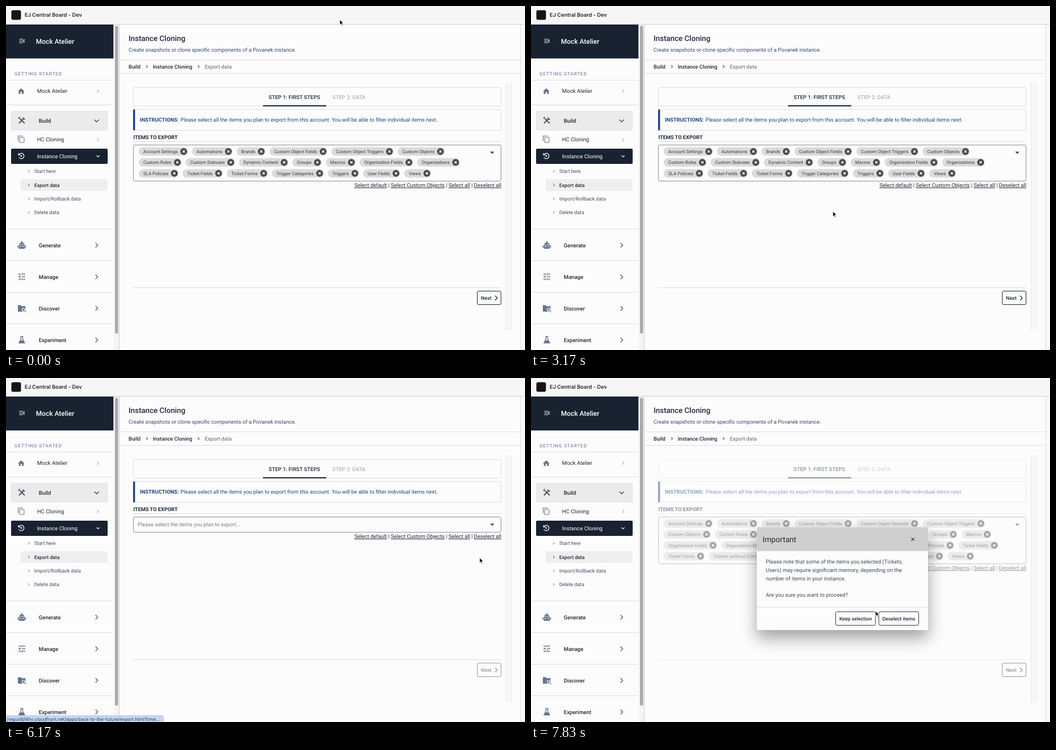
An HTML page for the animation above (8000 ms loop, 919x610 px).

```html
<!DOCTYPE html>
<html lang="en">
<head>
<meta charset="utf-8">
<title>Export data</title>
<style>
  html, body { margin: 0; width: 100%; height: 100%; overflow: hidden; background: #fcfcfd; }
  svg { display: block; font-family: Roboto, sans-serif; text-rendering: geometricPrecision; }
  text { white-space: pre; }
  .link { text-decoration: underline; }
  .dialog { filter: drop-shadow(0 14px 14px rgba(0, 0, 0, .36)); }
</style>
</head>
<body>
<svg id="stage" width="919" height="610" viewBox="0 0 919 610"></svg>
<script>
const NS = 'http://www.w3.org/2000/svg';
const stage = document.getElementById('stage');
const INK = '#1f2937', NAVY = '#182230', SLATE = '#66758c', BLUE = '#1f4585', LINE = '#dcdcde';
const UI = 'Inter, sans-serif';

function add(parent, tag, attrs = {}, content = '') {
  const el = document.createElementNS(NS, tag);
  for (const key in attrs) el.setAttribute(key, attrs[key]);
  el.textContent = content;
  return parent.appendChild(el);
}
const group = (parent, attrs) => add(parent, 'g', attrs);
const rect = (parent, x, y, width, height, fill, attrs) =>
  add(parent, 'rect', { x, y, width, height, fill, ...attrs });
const frame = (parent, x, y, w, h, stroke, attrs) =>
  rect(parent, x, y, w, h, 'none', { stroke, rx: 2.5, ...attrs });
const stroke = (parent, d, color, width = 1, attrs) =>
  add(parent, 'path', { d, fill: 'none', stroke: color, 'stroke-width': width, ...attrs });
const shape = (parent, d, fill, attrs) => add(parent, 'path', { d, fill, ...attrs });
// cy is the middle of the capital letters
const label = (parent, x, cy, content, size, fill = INK, weight = 400, attrs) =>
  add(parent, 'text', { x, y: cy + size * .355, 'font-size': size, fill, 'font-weight': weight, ...attrs }, content);
const chevron = (parent, x, y, r, color, width = 1.2, down) =>
  stroke(parent, `M${-r / 2} ${-r}L${r / 2} 0L${-r / 2} ${r}`, color, width,
    { transform: `translate(${x} ${y}) rotate(${down ? 90 : 0})` });
const icon = (x, y) => group(stage, { transform: `translate(${x} ${y})` });
const cross = (parent, x, y, r, color, width) =>
  stroke(parent, `M${x - r} ${y - r}l${2 * r} ${2 * r}m0 ${-2 * r}l${-2 * r} ${2 * r}`, color, width);

function drawTopBar() {
  rect(stage, 0, 0, 919, 32.5, '#f6f6f7');
  stroke(stage, 'M0 32.5H919', '#cfcfd1');
  rect(stage, 9.5, 7.5, 17, 17, '#151515', { rx: 3 });
  label(stage, 33, 16, 'EJ Central Board - Dev', 9.3, '#252525', 600, { 'font-family': UI });
}

function drawIcons() {
  stroke(icon(28, 62), 'M-4.5 -3H2.5M-4.5 0H1M-4.5 3H2.5M5 -2.5L2.5 0L5 2.5', '#fff', 1.2);
  shape(icon(27, 151), 'M0 -5L6 .5H4.3V5H1.3V1.5H-1.3V5H-4.3V.5H-6Z', SLATE);
  const tools = icon(28, 203);
  stroke(tools, 'M-5 5L3 -3M-3.5 -3.5L5 5', '#465265', 2);
  stroke(tools, 'M-6 -3.5L-3.5 -6M2 -5.5Q2 -2 5.8 -2.3', '#465265', 1.8);
  const copy = icon(27, 236.5);
  frame(copy, -3, -3.5, 8, 9, SLATE, { rx: 1, 'stroke-width': 1.1 });
  stroke(copy, 'M-5.5 3V-6H3', SLATE, 1.1);
  const clock = icon(27, 266);
  stroke(clock, 'M-4 -2.5A4.8 4.8 0 1 1 -4.2 2.2M-4.7 -5V-2H-1.7', '#fff', 1.3);
  add(clock, 'circle', { r: 1.4, fill: '#fff' });
  const robot = icon(28, 424);
  shape(robot, 'M-4.5 -1.5Q-4.5 -4.5 -1 -4.5V-7H1V-4.5Q4.5 -4.5 4.5 -1.5Z', SLATE);
  rect(robot, -5.5, -.8, 11, 7.3, SLATE, { rx: 1.2 });
  stroke(robot, 'M-6.8 1V4.5M6.8 1V4.5', SLATE, 1.4);
  for (const x of [-2.4, 2.4]) add(robot, 'circle', { cx: x, cy: 2.3, r: 1.1, fill: '#fff' });
  stroke(icon(28, 480), 'M-6 -4.5H0M3 -4.5H6M-6 0H-3M0 0H6M-6 4.5H-1M2 4.5H6M1.5 -6.5V-2.5M-3 -2V2M.5 2.5V6.5', SLATE, 1.3);
  const folder = icon(28, 536.5);
  shape(folder, 'M-7 -6H-2L-.5 -4.3H6.5V5.5H-7Z', SLATE);
  add(folder, 'circle', { cx: 3, cy: 2, r: 2.5, fill: SLATE, stroke: '#fff', 'stroke-width': 1.2 });
  stroke(folder, 'M5 4L7.5 6.5', '#fff', 2.6);
  stroke(folder, 'M5 4L7.5 6.5', SLATE, 1.3);
  const flask = icon(28, 592);
  stroke(flask, 'M-2.5 -6H2.5M-1.5 -6V-1.5L-5 5.5H5L1.5 -1.5V-6', SLATE, 1.4);
  shape(flask, 'M-2.7 1H2.7L5 5.5H-5Z', SLATE);
}

function drawSidebar() {
  rect(stage, 0, 33, 190.5, 60, NAVY);
  label(stage, 53, 62.3, 'Mock Atelier', 12, '#fff', 500);
  label(stage, 15, 120.3, 'GETTING STARTED', 8.2, '#5d6f90', 400, { 'letter-spacing': .95 });
  for (const y of [131.5, 175.5, 395.5, 451.5, 507.5, 563.5]) stroke(stage, `M0 ${y}H190`, LINE);
  rect(stage, 9.5, 186.5, 170, 33.5, '#ebebec', { stroke: '#e2e2e3', rx: 2 });
  rect(stage, 9, 253, 171, 27, NAVY, { rx: 2 });
  rect(stage, 26, 307, 153.5, 21, '#eeeeef', { rx: 2 });

  label(stage, 55, 151, 'Mock Atelier', 9.65);
  chevron(stage, 163, 151, 3, '#8a94a3', 1);
  label(stage, 58, 203.5, 'Build', 9.6, INK, 500);
  chevron(stage, 160.5, 203.5, 4, '#3c4858', 1.4, true);
  label(stage, 55, 236.8, 'HC Cloning', 9.65);
  chevron(stage, 163, 236.8, 3, '#8a94a3', 1);
  label(stage, 55, 266.3, 'Instance Cloning', 9.65, '#fff');
  chevron(stage, 163, 266.3, 2.6, '#fff', 1.1, true);
  ['Start here', 'Export data', 'Import/Rollback data', 'Delete data'].forEach((name, i) => {
    const y = 293.2 + i * 24.3, active = i === 1;
    chevron(stage, 40.5, y, 2, active ? INK : '#5b6675', 1);
    label(stage, 50, y, name, 8.75, active ? INK : '#3d4a60', active ? 500 : 400);
  });
  ['Generate', 'Manage', 'Discover', 'Experiment'].forEach((name, i) => {
    const y = 424.2 + i * 56;
    label(stage, 58, y, name, 9.6, INK, 500);
    chevron(stage, 160.5, y, 4, '#53627a', 1.4);
  });
  drawIcons();
  rect(stage, 190.5, 33, 10, 577, '#f4f4f5');
  rect(stage, 193, 35, 5.5, 546, '#a9a9ab', { rx: 2.75 });
  stroke(stage, 'M200.5 33V610', '#cdcdcf');
}

function drawHeader() {
  label(stage, 217, 57.5, 'Instance Cloning', 13.4, INK, 500);
  label(stage, 217, 77.5, 'Create snapshots or clone specific components of a Povanek instance.', 9.43, '#37486b');
  stroke(stage, 'M201 95.5H912M201 119.5H912', LINE);
  label(stage, 217, 107.5, 'Build', 9.35, INK, 500);
  chevron(stage, 249.5, 107.5, 2.5, '#5b6675', 1.1);
  label(stage, 260, 107.5, 'Instance Cloning', 9.3, INK, 500);
  chevron(stage, 341, 107.5, 2.5, '#5b6675', 1.1);
  label(stage, 352, 107.5, 'Export data', 9.3, '#7d8288', 500);
  rect(stage, 912, 33, 7, 577, '#f9f9fa');
  stroke(stage, 'M911.5 33V610', LINE);
  rect(stage, 885.5, 137, 10, 438, '#f6f6f7');
  stroke(stage, 'M885.5 137V575M895.5 137V575', '#e9e9ea');
}

function drawChips(parent, rows) {
  rows.forEach((row, i) => {
    const y = 258 + i * 19.35;
    let x = 235;
    for (const name of row.split('|')) {
      const pill = rect(parent, x, y - 7.5, 0, 15, '#dbdbdc', { rx: 7.5 });
      const width = label(parent, x + 8, y, name, 8.06, '#383838').getComputedTextLength();
      pill.setAttribute('width', width + 25.8);
      add(parent, 'circle', { cx: x + width + 18.5, cy: y, r: 6, fill: '#484848' });
      cross(parent, x + width + 18.5, y, 2, '#fff', 1.4);
      x += width + 33.1;
    }
  });
}

function drawForm(parent) {
  frame(parent, 225.5, 144.5, 651, 33, LINE);
  label(parent, 465, 161.5, 'STEP 1: FIRST STEPS', 9.45, INK, 500);
  label(parent, 578, 161.5, 'STEP 2: DATA', 9.45, '#b0b2b5', 500);
  rect(parent, 455, 176, 112, 2, NAVY);
  frame(parent, 225.5, 183.5, 651, 37, LINE);
  rect(parent, 225, 183.5, 3.5, 37, BLUE, { rx: 1 });
  label(parent, 237, 202, 'INSTRUCTIONS:', 9.35, BLUE, 700);
  label(parent, 309, 202, 'Please select all the items you plan to export from this account. You will be able to filter individual items next.', 9.43, BLUE);
  label(parent, 225.5, 233, 'ITEMS TO EXPORT', 9.25, INK, 600);
  stroke(parent, 'M225 240.5H877M225 499.5H877', LINE);

  const box = frame(parent, 225.5, 246.5, 651, 64, '#8e8e90');
  shape(parent, 'M857.3 258.2H864.7L861 262.2Z', '#444');
  const hint = label(parent, 233, 260, 'Please select the items you plan to export...', 9.43, '#7c7c7e');

  const links = group(parent);
  const line = label(links, 877, 0, '', 9.43, INK, 400, { 'text-anchor': 'end' });
  ['Select default', 'Select Custom Objects', 'Select all', 'Deselect all'].forEach((name, i) => {
    if (i) add(line, 'tspan', {}, ' | ');
    add(line, 'tspan', { class: 'link' }, name);
  });

  const next = group(parent);
  frame(next, 834.5, 505.5, 42, 24, INK);
  label(next, 841, 517.7, 'Next', 9, INK, 500);
  chevron(next, 868, 517.7, 4, INK, 1.3);

  const some = group(parent), all = group(parent);
  drawChips(some, [
    'Account Settings|Automations|Brands|Custom Object Fields|Custom Object Triggers|Custom Objects',
    'Custom Roles|Custom Statuses|Dynamic Content|Groups|Macros|Organization Fields|Organizations',
    'SLA Policies|Ticket Fields|Ticket Forms|Trigger Categories|Triggers|User Fields|Views'
  ]);
  drawChips(all, [
    'Account Settings|Automations|Brands|Custom Object Fields|Custom Object Records|Custom Object Triggers',
    'Custom Objects|Custom Roles|Custom Statuses|Dynamic Content|Group Memberships|Groups|Macros',
    'Organization Fields|Organization Memberships|Organization Subscriptions|Organizations|SLA Policies|Ticket Fields',
    'Ticket Forms|Tickets (without Comments)|Trigger Categories|Triggers|User Fields|Users|Views'
  ]);
  return { box, hint, links, next, some, all };
}

function drawDialog() {
  const dialog = group(stage, { class: 'dialog' });
  rect(dialog, 400, 264.5, 303, 182.5, '#fcfcfc', { rx: 2 });
  rect(dialog, 400, 264.5, 303, 42.5, '#cfcfd0', { rx: 2 });
  label(dialog, 410, 286, 'Important', 13.6);
  cross(dialog, 676, 286, 2.6, '#333', 1.2);
  ['Please note that some of the items you selected (Tickets,',
    'Users) may require significant memory, depending on the',
    'number of items in your instance.', '', 'Are you sure you want to proceed?'
  ].forEach((s, i) => label(dialog, 415.7, 325.5 + i * 14.85, s, 9.55, '#444a52'));
  stroke(dialog, 'M400 406.5H703', LINE);
  [[539.5, 'Keep selection'], [616, 'Deselect items']].forEach(([x, s]) => {
    frame(dialog, x, 414.5, 70.5, 24, '#333a44');
    label(dialog, x + 35.25, 427, s, 8.75, INK, 500, { 'text-anchor': 'middle' });
  });
  return dialog;
}

function drawStatus() {
  const bar = group(stage);
  shape(bar, 'M0 598.5H276Q279 598.5 279 601.5V610H0Z', '#c4d6f0', { stroke: '#aebfd8', 'stroke-width': .6 });
  label(bar, 272, 605, '/wgux8jf4hv.cloudfront.net/apps/back-to-the-future/export.html?time...', 8,
    '#33415a', 400, { 'text-anchor': 'end', 'font-family': UI });
  return bar;
}

drawTopBar();
drawSidebar();
drawHeader();
const form = group(stage);
const { box, hint, links, next, some, all } = drawForm(form);
const dialog = drawDialog();
const status = drawStatus();
const cursor = group(stage);
const arrow = shape(cursor, 'M0 0V9.4L2.1 7.5L3.6 10.9L5.2 10.2L3.7 6.9H6.6Z', '#000',
  { stroke: '#fff', 'stroke-width': .9 });
const hand = shape(cursor, 'M-1 .8Q0 -.5 1 .8V4L4.2 4.5Q5.6 4.8 5.4 6.5L4.6 10.5H-.8L-3.8 6.6Q-3.6 5 -1 6.8Z', '#fff',
  { stroke: '#000' });

// Pointer path as [time, x, y]
const path = [
  [0, 591, 24], [333, 533, 428], [2167, 533, 428], [2333, 532, 418], [2667, 533, 400], [2833, 533, 400],
  [3500, 536, 328], [4000, 536, 328], [4167, 535.5, 321], [4333, 540, 320], [4667, 540, 320],
  [5333, 838.5, 318.5], [6167, 838.5, 318.5], [6667, 801.5, 281.5], [7167, 801.5, 281.5], [7833, 610, 413]
];
function pointer(t) {
  const i = path.findIndex(p => p[0] > t);
  if (i < 0) return path[path.length - 1].slice(1);
  const [t0, x0, y0] = path[i - 1], [t1, x1, y1] = path[i];
  const k = (t - t0) / (t1 - t0);
  return [x0 + (x1 - x0) * k, y0 + (y1 - y0) * k];
}
const show = (el, on) => el.setAttribute('visibility', on ? 'visible' : 'hidden');

// The picture advances six times a second
function render(ms) {
  const step = Math.floor((ms % 8000 + 4) * 6 / 1000) % 48;
  const cleared = step >= 36 && step < 41, filled = step >= 41;
  const height = cleared ? 27 : filled ? 83 : 64;
  show(some, step < 36);
  show(all, filled);
  show(hint, cleared);
  box.setAttribute('height', height);
  links.setAttribute('transform', `translate(0 ${246.5 + height + 7.2})`);
  next.setAttribute('opacity', cleared ? .45 : 1);

  const open = step >= 43, opening = step === 43;
  form.setAttribute('opacity', opening ? .7 : open ? .48 : 1);
  show(dialog, open);
  dialog.setAttribute('opacity', opening ? .6 : 1);
  dialog.setAttribute('transform', `translate(551.5 355.75) scale(${opening ? .83 : 1}) translate(-551.5 -355.75)`);
  show(status, step >= 34 && step <= 43);
  status.setAttribute('opacity', opening ? .1 : 1);

  const onLink = step >= 33 && step < 37 || step >= 40 && step < 43;
  show(hand, onLink);
  show(arrow, !onLink);
  cursor.setAttribute('transform', `translate(${pointer(Math.round(step * 1000 / 6))})`);
}
function tick() {
  render(performance.now());
  requestAnimationFrame(tick);
}
tick();
</script>
</body>
</html>
```
